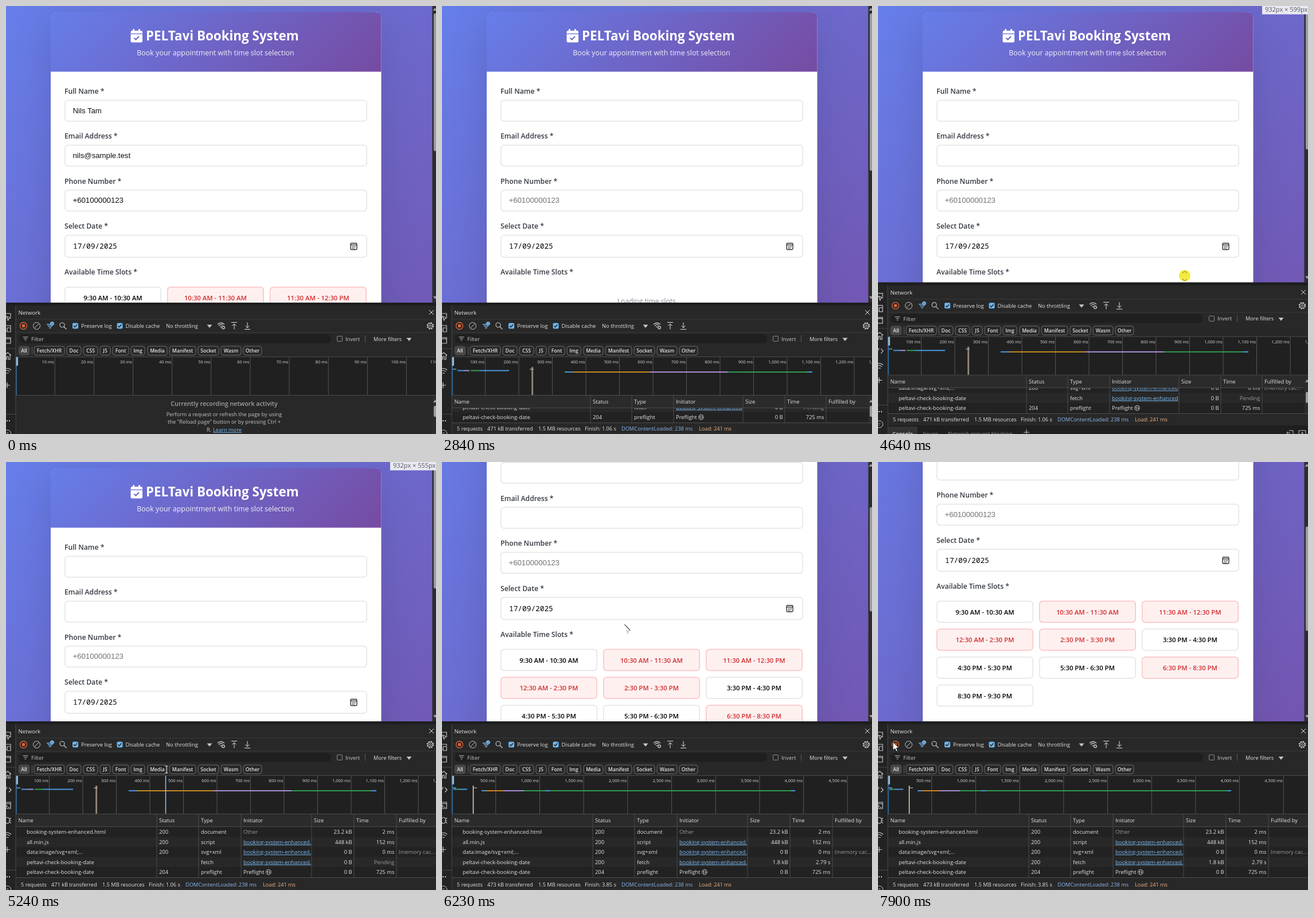
An HTML page that plays this animation: 750x746 px, repeating every 8 s.

```html
<!DOCTYPE html>
<html lang="en">
<head>
<meta charset="utf-8">
<title>Booking form with network panel</title>
<style>
html, body { margin: 0; width: 100%; height: 100%; overflow: hidden; background: #282828; }
svg { display: block; width: 100%; height: 100%; font-family: "Open Sans", "Noto Sans", sans-serif; }
.sans { font-family: "Liberation Sans", sans-serif; }
.mono { font-family: "Noto Sans Mono", "DejaVu Sans Mono", monospace; }
.card { filter: drop-shadow(0 16px 32px rgba(0, 0, 0, .12)); }
text { white-space: pre; }
</style>
</head>
<body>
<svg id="stage" viewBox="0 0 750 746"></svg>
<script>
const LOOP = 8000;
const svg = document.getElementById('stage');
const INK = '#e3e3e3', SOFT = '#c7c7c7', DIM = '#9a9a9a', LINK = '#7cbcf5', RULE = '#4a4a4a', PANEL = '#282828';

function el(parent, tag, attrs = {}, text) {
  const node = document.createElementNS('http://www.w3.org/2000/svg', tag);
  for (const k in attrs) node.setAttribute(k, attrs[k]);
  if (text !== undefined) node.textContent = text;
  return parent.appendChild(node);
}
const group = parent => el(parent, 'g');
const rect = (p, x, y, width, height, fill, more) => el(p, 'rect', { x, y, width, height, fill, ...more });
const path = (p, d, stroke = INK, more) => el(p, 'path', { d, fill: 'none', stroke, 'stroke-width': 1, ...more });
const icon = (p, x, y, d, stroke, more) => path(p, d, stroke, { transform: `translate(${x} ${y})`, ...more });
const ring = (p, cx, cy, r, stroke, more) => el(p, 'circle', { cx, cy, r, fill: 'none', stroke, ...more });
// y is the middle of the capitals
const label = (p, x, y, str, size, fill = INK, more) =>
  el(p, 'text', { x, y: y + size * 0.36, 'font-size': size, fill, ...more }, str);
const MID = { 'text-anchor': 'middle' }, END = { 'text-anchor': 'end' };
const SEMI = { 'font-weight': 600 }, UNDER = { 'text-decoration': 'underline' };
const show = (node, on) => node.setAttribute('visibility', on ? 'inherit' : 'hidden');
const move = (node, x, y) => node.setAttribute('transform', `translate(${x} ${y})`);

// 135 degree gradient over a box, as CSS lays it out
const defs = el(svg, 'defs');
function diagonal(id) {
  const g = el(defs, 'linearGradient', { id, gradientUnits: 'userSpaceOnUse' });
  el(g, 'stop', { offset: 0, 'stop-color': '#667eea' });
  el(g, 'stop', { offset: 1, 'stop-color': '#764ba2' });
  return g;
}
function fitDiagonal(g, x, y, w, h) {
  const cx = x + w / 2, cy = y + h / 2, r = (w + h) / 4;
  const ends = { x1: cx - r, y1: cy - r, x2: cx + r, y2: cy + r };
  for (const k in ends) g.setAttribute(k, ends[k]);
}
const bodyPaint = diagonal('body');
fitDiagonal(diagonal('head'), 78, 11, 576, 103);

// ---- booking page ----
const page = group(svg);
rect(page, 0, 0, 744, 1060, 'url(#body)');
rect(page, 78, 11, 576.5, 1000, '#fff', { rx: 10, class: 'card' });
path(page, 'M78 114.5V21Q78 11 88 11H644Q654.5 11 654.5 21V114.5Z', 'none', { fill: 'url(#head)' });
rect(page, 217.5, 43, 20.5, 20.5, '#fff', { rx: 2.5 });
for (const x of [221, 231]) rect(page, x, 40, 3, 5, '#fff', { rx: 1.2 });
path(page, 'M217.5 48.5H238', '#6b6fd3', { 'stroke-width': 1.3 });
path(page, 'M223.5 55.5l3 3l5.5 -5.5', '#6b69cd', { 'stroke-width': 2 });
label(page, 244, 52, 'PELTavi Booking System', 22.4, '#fff', { 'font-weight': 700 });
label(page, 365.5, 82, 'Book your appointment with time slot selection', 12.45, '#fff', { ...MID, opacity: 0.9 });

const boxed = (p, x, y, w, h, fill, stroke) =>
  rect(p, x, y, w, h, fill, { rx: 5.5, stroke, 'stroke-width': 1.5 });
const heading = (y, str) => label(page, 102, y, str, 12.2, '#333840', SEMI);
['Full Name *', 'Email Address *', 'Phone Number *', 'Select Date *'].forEach((str, i) => {
  const y = 148.5 + 78.4 * i;
  heading(y, str);
  boxed(page, 102.7, y + 15.7, 526.5, i === 3 ? 38.5 : 36.5, '#fff', '#e1e4e8');
});
heading(464, 'Available Time Slots *');
label(page, 117, 418.7, '17/09/2025', 12.8, '#000', { class: 'mono' });
rect(page, 601, 413.5, 11, 11, 'none', { rx: 1.5, stroke: '#222', 'stroke-width': 1.3 });
path(page, 'M601 416.5H612', '#222', { 'stroke-width': 1.3 });
path(page, 'M603.5 419.5H610M603.5 422H608', '#222', { 'stroke-width': 1.5, 'stroke-dasharray': '1.5 1' });

const PHONE = '+60100000123';
const filled = group(page), blank = group(page), slots = group(page);
const value = (p, y, str, fill) => label(p, 116.5, y, str, 13.2, fill, { class: 'sans' });
value(filled, 182, 'Nils Tam', '#111');
value(filled, 260.3, 'nils@sample.test', '#111');
value(filled, 338.5, PHONE, '#111');
value(blank, 338.5, PHONE, '#757575');
const loading = label(page, 361.5, 515, 'Loading time slots...', 12, '#80858c', MID);

['9:30 AM - 10:30 AM', '10:30 AM - 11:30 AM', '11:30 AM - 12:30 PM', '12:30 AM - 2:30 PM', '2:30 PM - 3:30 PM',
 '3:30 PM - 4:30 PM', '4:30 PM - 5:30 PM', '5:30 PM - 6:30 PM', '6:30 PM - 8:30 PM', '8:30 PM - 9:30 PM']
  .forEach((str, i) => {
    const taken = [1, 2, 3, 4, 8].includes(i);
    const x = 102.7 + (i % 3) * 179, y = 490 + Math.floor(i / 3) * 48.7;
    boxed(slots, x, y, 167.5, 37, taken ? '#fff0f0' : '#fff', taken ? '#fcc0c0' : '#e1e4e8');
    label(slots, x + 83.7, y + 19, str, 11.3, taken ? '#d02c2c' : '#000', { ...MID, ...SEMI });
  });

const pageBar = group(svg);
rect(pageBar, 743.5, 0, 7, 746, '#2c2c2c');
const thumb = rect(pageBar, 746, 0, 5, 10, '#9c9c9c', { rx: 2 });
path(pageBar, 'M744.5 8l3.5 -5l3.5 5z', 'none', { fill: '#9c9c9c' });
const downArrow = path(pageBar, 'M745 -11h7l-3.5 5z', 'none', { fill: '#9c9c9c' });

// ---- table rows, hung from the footer ----
const base = rect(svg, 0, 0, 750, 746, PANEL);
const ROW = 17.4;
const oldCols = [259, 331, 404, 525, 598, 670], newCols = [263, 336, 410, 533, 607, 681];

function makeRows(cols, done) {
  const g = group(svg), check = 'peltavi-check-booking-date', type = 'svg+xml';
  const inline = ['data', `image/${type};...`].join(':');
  const file = 'booking-system-enhanced' + (cols === newCols ? '.' : '');
  [['booking-system-enhanced.html', '200', 'document', 'Other', '23.2 kB', '2 ms'],
   ['all.min.js', '200', 'script', file, '448 kB', '152 ms'],
   [inline, '200', type, file, '0 B', '0 ms', '(memory cac...'],
   [check, done ? '200' : '', 'fetch', file, done ? '1.8 kB' : '0 B', done ? '2.79 s' : 'Pending'],
   [check, '204', 'preflight', 'Preflight', '0 B', '725 ms']]
    .forEach(([name, code, kind, from, size, time, by = ''], i) => {
      const y = -9.8 - ROW * (4 - i);
      const cell = (x, str, fill, more) => label(g, x, y, str, 9.4, fill, more);
      rect(g, 17, y - ROW / 2, 733, ROW, i % 2 ? '#282828' : '#222');
      cell(36, name);
      cell(cols[0] + 4, code);
      cell(cols[1] + 4, kind);
      if (from === file) cell(cols[2] + 4, from, LINK, UNDER);
      else cell(cols[2] + 4, from, from === 'Other' ? DIM : INK);
      if (from === 'Preflight') {
        ring(g, cols[2] + 48, y, 4.3, INK, { 'stroke-width': 0.9 });
        icon(g, cols[2] + 48, y, 'M-1.5 2.5V-2L-2.7 -0.5M1.5 -2.5V2L2.7 0.5', INK, { 'stroke-width': 0.9 });
      }
      cell(cols[4] - 3.5, size, INK, END);
      cell(cols[5] - 3.5, time, time === 'Pending' ? DIM : INK, END);
      cell(cols[5] + 4, by, DIM);
    });
  return g;
}
const rowSets = [null, makeRows(oldCols, false), makeRows(newCols, false), makeRows(newCols, true)];
const hover = rect(svg, 17, 0, 727, ROW, '#fff', { opacity: 0.07 });

// ---- empty state ----
const empty = group(svg);
const note = (x, y, str, fill, more) => label(empty, x, y, str, 9.25, fill, more);
label(empty, 380.5, 693, 'Currently recording network activity', 10.7, '#a3a3a3', { ...MID, ...SEMI });
note(380.5, 712, 'Perform a request or refresh the page by using', '#c4c4c4', MID);
note(380.5, 725, 'the "Reload page" button or by pressing Ctrl +', '#c4c4c4', MID);
note(350, 738.5, 'R.', '#c4c4c4');
note(361, 738.5, 'Learn more', LINK, UNDER);

// ---- docked panel, y from its top edge ----
const dock = group(svg);
rect(dock, 0, 0, 750, 162, PANEL);
rect(dock, 0, 0, 750, 5, '#1d1e20');
label(dock, 21.5, 17.3, 'Network', 9.7);
icon(dock, 742, 17, 'M-4 -4L4 4M4 -4L-4 4');
path(dock, 'M17 29H750M17 52H750', '#3a3a3a');

ring(dock, 30.5, 40.5, 6, '#d9663d', { 'stroke-width': 1.3 });
rect(dock, 28, 38, 5, 5, '#d9663d');
ring(dock, 53.5, 40.5, 6, SOFT);
icon(dock, 53.5, 40.5, 'M-4 4L4 -4', SOFT);
icon(dock, 77, 41, 'M-6 -3H2M-4 0H4M-2 3H2', LINK, { 'stroke-width': 1.3 });
el(dock, 'circle', { cx: 80.5, cy: 36.5, r: 3.3, fill: LINK });
icon(dock, 80.5, 36.5, 'M-1 -1L1 1M1 -1L-1 1', PANEL, { 'stroke-width': 0.8 });
ring(dock, 98, 39, 4, SOFT, { 'stroke-width': 1.2 });
icon(dock, 99, 40, 'M2 2L6.5 6.5', SOFT, { 'stroke-width': 1.2 });
[[121, 'Preserve log'], [198.5, 'Disable cache']].forEach(([x, str]) => {
  rect(dock, x - 5, 35.5, 10, 10, '#6db7f2', { rx: 2 });
  icon(dock, x, 40.5, 'M-3 0l2 2.3l4 -4.5', '#1f1f1f', { 'stroke-width': 1.4 });
  label(dock, x + 10, 40.7, str, 9.4);
});
label(dock, 279, 40.7, 'No throttling', 9.4);
const drop = (x, y) => icon(dock, x, y, 'M-4.5 -2.5H4.5L0 3Z', 'none', { fill: SOFT });
drop(355, 41);
icon(dock, 375, 40, 'M-6 -2Q0 -7.5 6 -2M-4 0.5Q0 -3.5 3 -0.5M-1.5 3Q0 1.5 1 2.5', SOFT, { 'stroke-width': 1.3 });
ring(dock, 379, 43.5, 2.3, SOFT, { 'stroke-width': 1.4 });
icon(dock, 398, 40.5, 'M-5 -6H5M0 6V-3M-3.5 0L0 -3.5L3.5 0');
icon(dock, 421, 40.5, 'M-5 6H5M0 -6V3M-3.5 0L0 3.5L3.5 0');
ring(dock, 740, 40.5, 5.2, SOFT, { 'stroke-width': 2, 'stroke-dasharray': '2.5 1.58' });
ring(dock, 740, 40.5, 4.2, SOFT);
ring(dock, 740, 40.5, 1.8, SOFT);

rect(dock, 22, 55, 545, 16, '#1f1f1f', { rx: 8 });
icon(dock, 34, 63, 'M-4.5 -3H4.5M-2.7 0H2.7M-1 3H1', SOFT);
label(dock, 44, 63.3, 'Filter', 9.4, SOFT);
rect(dock, 577.5, 58.5, 9, 9, 'none', { rx: 1.5, stroke: '#8a8a8a' });
label(dock, 592, 63.3, 'Invert', 9.3, SOFT);
path(dock, 'M626.5 57V69', '#5a5a5a');
label(dock, 641, 63.3, 'More filters', 9.2, INK, { 'font-weight': 500 });
drop(703, 64);

path(dock, 'M45.5 77V91', '#5a5a5a');
[['All', 22, 41], ['Fetch/XHR', 49, 102], ['Doc', 106, 131], ['CSS', 135, 160], ['JS', 164, 182], ['Font', 186, 214],
 ['Img', 218, 242], ['Media', 247, 281], ['Manifest', 285, 331], ['Socket', 335, 371], ['Wasm', 375, 410], ['Other', 414, 446]]
  .forEach(([str, a, b], i) => {
    rect(dock, a, 76, b - a, 15.5, i ? 'none' : '#484848', { rx: 4, stroke: i ? '#747474' : '#484848', 'stroke-width': 0.9 });
    label(dock, (a + b) / 2, 84, str, 8.65, INK, { ...MID, ...SEMI });
  });

// overview strip
rect(dock, 17, 94.5, 733, 67, '#202020');
path(dock, 'M17 94.5H750M17 161.5H750', RULE);
const overview = (pitch, step) => {
  const g = group(dock);
  for (let i = 1, x = 17 + pitch; x < 800; i++, x += pitch) {
    path(g, `M${x} 95V161`, '#555');
    label(g, x - 1.5, 103.7, (i * step).toLocaleString('en-US') + ' ms', 7.5, '#d6d6d6', END);
  }
  return g;
};
const BLUE = '#4a97dd', GREEN = '#2f9c50', LILAC = '#a98fd8', AMBER = '#c58a1f', SLATE = '#5f7f92';
// runs of [end, colour] from a start
function bars(g, y, x, ...runs) {
  for (const [end, fill] of runs) { rect(g, x, y - 1, end - x, 2, fill); x = end; }
}
const views = [overview(68.15, 10), overview(58.5, 100), overview(76.7, 500)];
bars(views[1], 116, 17, [25, SLATE]);
bars(views[1], 118.5, 27, [39, BLUE], [48, LILAC], [50, '#202020'], [65, GREEN], [117, BLUE]);
bars(views[1], 121, 214, [228, BLUE], [363, AMBER], [498, LILAC], [637, GREEN], [646, BLUE]);
bars(views[1], 116, 153, [160, '#777']);
path(views[1], 'M157 112V161', '#e8d3b8');
path(views[1], 'M158.5 112V161', '#9c8f86');
bars(views[2], 116, 18, [25, SLATE]);
bars(views[2], 118.5, 20, [24, BLUE], [29, GREEN], [44, BLUE]);
bars(views[2], 121, 69, [77, BLUE], [107, '#d08327'], [143, LILAC], [180, GREEN], [188, BLUE], [609, GREEN], [616, BLUE]);
bars(views[2], 116, 55, [61, '#777']);
path(views[2], 'M54.5 112V161', '#f0d9be', { 'stroke-width': 1.5 });
path(dock, 'M18 95V161', '#2f7fc4', { 'stroke-width': 1.5 });
rect(dock, 17, 95, 4, 15, '#8fb6d4', { rx: 1 });
const hairline = path(dock, 'M278.5 95V161', '#8fc3ee', { 'stroke-width': 1.5 });

// column heads
const makeHead = cols => {
  const g = group(dock);
  rect(g, 17, 162, 733, 21.5, '#2b2b2b');
  path(g, 'M17 183.5H750', RULE);
  label(g, 21.5, 173, 'Name', 9.4);
  ['Status', 'Type', 'Initiator', 'Size', 'Time', 'Fulfilled by'].forEach((str, i) => {
    label(g, cols[i] + 4, 173, str, 9.4);
    path(g, `M${cols[i]} 162V300`, RULE);
  });
  return g;
};
const oldHead = makeHead(oldCols), newHead = makeHead(newCols);
const tableBar = group(dock);
rect(tableBar, 744, 162, 6, 140, '#2c2c2c');
path(tableBar, 'M745 174l3.5 -5l3.5 5z', 'none', { fill: '#9c9c9c' });
const tableThumb = rect(tableBar, 746, 180, 5, 19, '#9c9c9c', { rx: 2 });

// ---- footer ----
const foot = group(svg);
rect(foot, 17, 0, 733, 60, PANEL);
path(foot, 'M17 0H750', RULE);
const status = group(svg);
const makeStatus = (sent, finish) => {
  const g = group(status);
  [[26, '5 requests'], [79, sent + ' kB transferred'], [168, '1.5 MB resources'], [249, `Finish: ${finish} s`],
   [313, 'DOMContentLoaded: 238 ms', '#8db8f2'], [448, 'Load: 241 ms', '#f0b48a']]
    .forEach(([x, str, fill]) => label(g, x, 737, str, 9.2, fill));
  return g;
};
const pendingStatus = makeStatus(471, '1.06'), doneStatus = makeStatus(473, '3.85');
const drawer = group(svg);
rect(drawer, 17, 731, 733, 15, '#1f1f1f');
rect(drawer, 17, 733, 52, 13, '#333');
label(drawer, 25, 745.5, 'Console', 9.4, INK, SEMI);
label(drawer, 78, 745.5, 'Issues', 9.4, DIM);
label(drawer, 122, 745.5, 'Network request blocking', 9.4, DIM);
icon(drawer, 259, 743, 'M-5 0H5M0 -5V5', SOFT);
icon(drawer, 718, 744, 'M-5 0H1M-3 -2.5L-5 0L-3 2.5M-1 -4H6V4', SOFT);
icon(drawer, 740, 744, 'M-6 5V-4H6V5M0 4V-1M-2 1L0 -1L2 1', SOFT);

// ---- activity bar, cut by the left edge ----
const side = group(svg);
rect(side, 0, 5, 17, 300, '#222325');
path(side, 'M17 5V300M0 80H17', RULE);
const GLYPH = {
  pick: 'M-5 -5H8V1M1 0L8 2.5L5 4L3.5 7Z',
  device: 'M-5 -5H8V-2M2 -1H8V6H2ZM-4 4H1',
  pane: 'M-4 -5H8V5H-4ZM-4 -3H8',
  home: 'M-4 0L3 -6L9 -1M7 -2V6H4V1H1V6H-2',
  code: 'M-3 5L2 -5M5 -4L9 0L5 4',
  prompt: 'M-4 -5H8V6H-4ZM-4 -2.5H8M0 0L2 2L0 4M3 4H6',
  bug: 'M-1 -3Q3 -7 6 -3V3Q3 8 -1 3ZM6 -2L9 -4M6 0.5H9M6 3L9 5',
  wifi: 'M-6 -2Q3 -8 9 -2M-3 1Q3 -4 6.5 1M1 4Q3 2 4.5 4',
  plus: 'M-3 0H7M2 -5V5'
};
const glyph = (p, name, y) => icon(p, 0, y, GLYPH[name], SOFT, { 'stroke-width': 1.2 });
['pick', 'device', 'pane'].forEach((name, i) => glyph(side, name, 24 + 21 * i));
const tabs = ['home wifi plus', 'home code wifi plus', 'home code prompt bug wifi plus'].map(names => {
  const g = group(side);
  names.split(' ').forEach((name, i) => glyph(g, name, 93 + 26.5 * i - (name === 'plus' ? 2 : 0)));
  return g;
});
const sideEnd = group(svg);
rect(sideEnd, 0, 711, 16.5, 60, '#222325');
path(sideEnd, 'M0 711.5H17', RULE);
for (const x of [1, 5]) rect(sideEnd, x, 722, 2, 2, SOFT);
ring(sideEnd, 2.5, 745, 6, SOFT);
label(sideEnd, 0.5, 745, '?', 8, SOFT);

// ---- size tip and pointer ----
const tip = group(svg);
rect(tip, 670, 0, 80, 14.5, '#e9e9f3');
const tipText = label(tip, 675, 6, '', 11, '#55555c');

const pointer = group(svg);
const press = el(pointer, 'circle', { r: 10, fill: '#f3ea3f' });
const shapes = {
  arrow: path(pointer, 'M0 0V14.5L3.5 11.3L6 16.5L8.3 15.5L6 10.5H10.5Z', '#111', { fill: '#fff', 'stroke-width': 0.9 }),
  ghost: group(pointer),
  resize: path(pointer, 'M-4 -4.5L0 -7.5L4 -4.5M-4 6.5L0 9L4 6.5', '#4a4620', { 'stroke-dasharray': '2 1' }),
  beam: path(pointer, 'M-2.5 -6H2.5M0 -6V6M-2.5 6H2.5', '#e8e8e8')
};
path(shapes.ghost, 'M0 0L10 10.5', '#333', { 'stroke-width': 1.1 });
path(shapes.ghost, 'M3 11H9M5 13H7M5 15H7.5', '#444', { 'stroke-dasharray': '1.3 1.3' });

// ---- motion: time, then values ----
const dockKeys = [[4440, 517], [4640, 482], [4840, 452]];
const scrollKeys = [[5460, 0], [5620, 163.5], [6300, 163.5], [6460, 247.5]];
const pointerKeys = [[380, 705, 738], [1110, 363, 267], [1440, 363, 267], [2240, 655, 650], [3370, 640, 738], [4100, 530, 517],
  [4370, 535, 517], [4640, 535, 470], [4840, 535, 452], [5200, 280, 536], [5270, 280, 536], [5480, 317, 302],
  [6100, 317, 302], [6880, 325, 190], [6990, 325, 190], [7770, 85, 540], [7900, 26, 488]];

function at(keys, t, col = 1, ease = k => k) {
  const i = keys.findIndex(k => k[0] > t);
  if (i === 0) return keys[0][col];
  if (i < 0) return keys[keys.length - 1][col];
  const a = keys[i - 1], b = keys[i];
  return a[col] + (b[col] - a[col]) * ease((t - a[0]) / (b[0] - a[0]));
}
const smooth = k => k * k * (3 - 2 * k);
const within = (t, a, b) => t >= a && t < b;

function render(t) {
  const phase = t < 2840 ? 0 : t < 4840 ? 1 : t < 5400 ? 2 : 3;
  const top = at(dockKeys, t), scroll = at(scrollKeys, t, 1, smooth);
  const dragging = within(t, 4520, 4840);
  const waiting = phase === 1 || phase === 2;
  const docH = waiting ? 919 : 1050;

  move(page, 0, -scroll);
  fitDiagonal(bodyPaint, 0, 0, 744, docH);
  show(filled, phase === 0);
  show(blank, phase > 0);
  show(slots, !waiting);
  show(loading, waiting);
  const track = top - 30;
  thumb.setAttribute('y', 13 + scroll * track / docH);
  thumb.setAttribute('height', track * top / docH);
  move(downArrow, 0, top);

  base.setAttribute('y', top);
  move(dock, 0, top);
  move(side, 0, top);
  tabs.forEach((g, i) => show(g, i === (top > 500 ? 0 : top > 470 ? 1 : 2)));
  views.forEach((g, i) => show(g, i === (phase === 3 ? 2 : Math.min(phase, 1))));
  show(hairline, within(t, 5170, 5320));
  show(empty, phase === 0);
  show(oldHead, phase === 1);
  show(newHead, phase > 1);
  show(tableBar, phase < 2);
  tableThumb.setAttribute('y', dragging ? 191 : 180);

  const footY = dragging ? 710.5 : phase === 1 ? 726.5 : 724.5;
  rowSets.forEach((g, i) => { if (g) { show(g, i === phase); move(g, 0, footY); } });
  move(foot, 0, footY);
  show(foot, phase > 0);
  const lift = dragging ? -16 : 0;
  move(status, 0, lift);
  move(sideEnd, 0, lift);
  show(pendingStatus, waiting);
  show(doneStatus, phase === 3);
  show(drawer, dragging);

  show(tip, within(t, 4440, 5980));
  tipText.textContent = `932px × ${Math.round(555 + (top - 452) * 44 / 30)}px`;

  const x = at(pointerKeys, t), y = at(pointerKeys, t, 2);
  const kind = within(t, 4080, 4880) ? 'resize' : within(t, 5150, 5300) ? 'beam' : y < top ? 'ghost' : 'arrow';
  show(pointer, t >= 380 && !within(t, 2840, 3370));
  move(pointer, x, y);
  for (const k in shapes) show(shapes[k], k === kind);
  // nested nodes must not outlive a hidden pointer
  show(press, within(t, 4400, 4860));
  const row = Math.floor((footY - y) / ROW);
  show(hover, within(t, 3370, 4100) && y > top + 183 && y < footY);
  hover.setAttribute('y', footY - (row + 1) * ROW);
}

const start = performance.now();
function tick() {
  render((performance.now() - start) % LOOP);
  requestAnimationFrame(tick);
}
tick();
</script>
</body>
</html>
```
